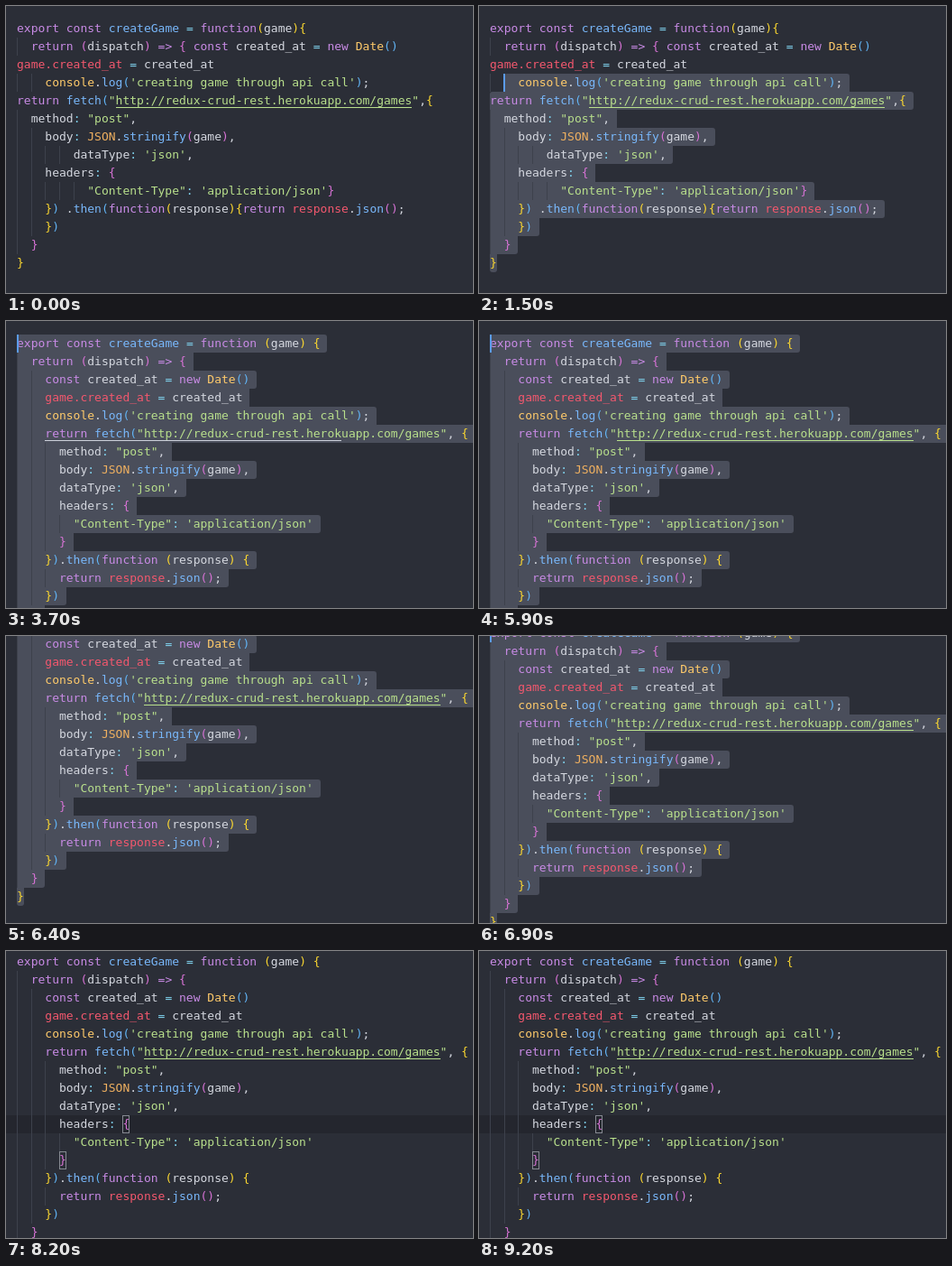
Animation of 518x318 px, one loop 9.3 s. Source, as an HTML page:

```html
<!DOCTYPE html>
<html lang="en">
<head>
<meta charset="utf-8">
<title>Code formatting</title>
<style>
  html, body { margin: 0; width: 100%; height: 100%; overflow: hidden; background: #2b2e37; }
  #stage {
    position: relative; width: 518px; height: 318px; overflow: hidden;
    background: #2b2e37; color: #d5d8e0;
    font: 13px/20px "DejaVu Sans Mono", "Liberation Mono", monospace;
    font-variant-ligatures: none;
  }
  .doc { position: absolute; left: 12px; top: 15px; width: 600px; }
  .doc div { position: absolute; box-sizing: border-box; height: 20px; white-space: pre; }
  .doc .sel { background: #4a4e5b; }
  .doc .guide { width: 1px; background: #3d414c; }
  .doc .link { height: 1px; background: #b9e08c; }
  .doc .link.stale { background: #ccd0da; }
  .doc .caret { width: 2px; margin-left: -.5px; background: #5b9bea; }
  .doc .active { left: -12px; width: 518px; background: rgba(0, 0, 0, .17); }
  .doc .match { width: 1ch; border: 1px solid #868a92; }
  .key { color: #c98be6; }
  .fn { color: #79b8fb; }
  .str { color: #b9e08c; }
  .type { color: #ffcb6b; }
  .json { color: #efb060; }
  .obj { color: #f4586e; }
  .op { color: #80d3ee; }
  .b0 { color: #fcd830; }
  .b1 { color: #d873d6; }
  .b2 { color: #62b5f6; }
</style>
</head>
<body>
<div id="stage"></div>
<script>
const LOOP = 9300, STEP = 100, ROW = 20;
const DRAG = 1000, FORMAT = 3500, RELINK = 4300, CLICK = 7500;
const URL_LENGTH = 42;

const roughCode = `export const createGame = function(game){
  return (dispatch) => { const created_at = new Date()
game.created_at = created_at
    console.log('creating game through api call');
return fetch("http://redux-crud-rest.herokuapp.com/games",{
  method: "post",
    body: JSON.stringify(game),
        dataType: 'json',
    headers: {
          "Content-Type": 'application/json'}
    }) .then(function(response){return response.json();
    })
  }
}`;

const tidyCode = `export const createGame = function (game) {
  return (dispatch) => {
    const created_at = new Date()
    game.created_at = created_at
    console.log('creating game through api call');
    return fetch("http://redux-crud-rest.herokuapp.com/games", {
      method: "post",
      body: JSON.stringify(game),
      dataType: 'json',
      headers: {
        "Content-Type": 'application/json'
      }
    }).then(function (response) {
      return response.json();
    })
  }
}`;

const TOKEN = new RegExp([
  /(?<str>"[^"]*"|'[^']*')/,
  /(?<key>\b(?:export|const|return|function|new)\b|=>)/,
  /(?<type>\b(?:console|Date)\b)/,
  /(?<json>\bJSON\b)/,
  /(?<fn>\bcreateGame\b|\w+(?=\())/,
  /(?<obj>\b(?:game|response)(?=\.)|(?<=game)\.created_at)/,
  /(?<op>[=:])/,
  /(?<br>[(){}])/,
  /(?<txt>\w+|\s+|.)/
].map(r => r.source).join("|"), "g");

const stage = document.getElementById("stage");

function add(parent, tag, cls, text = "") {
  const el = document.createElement(tag);
  el.className = cls;
  el.textContent = text;
  return parent.appendChild(el);
}

function place(el, row, col, width) {
  el.style.top = row * ROW + "px";
  el.style.left = col + "ch";
  if (width !== undefined) el.style.width = width + "ch";
  return el;
}

function show(el, on) {
  el.style.display = on ? "" : "none";
}

// Brackets take one of three colours by nesting depth.
function paint(el, text, depth) {
  for (const m of text.matchAll(TOKEN)) {
    let cls = Object.keys(m.groups).find(k => m.groups[k] !== undefined);
    if (cls === "br") {
      if (/[)}]/.test(m[0])) depth--;
      cls = "b" + depth % 3;
      if (/[({]/.test(m[0])) depth++;
    }
    add(el, "span", cls, m[0]);
  }
  return depth;
}

function makeDoc(code) {
  const el = add(stage, "div", "doc");
  const lines = code.split("\n");
  const active = add(el, "div", "active");
  const sels = lines.map(() => add(el, "div", "sel"));
  let depth = 0;
  lines.forEach((text, row) => {
    const indent = text.search(/\S/);
    for (let col = 0; col < indent; col += 2) place(add(el, "div", "guide"), row, col);
    depth = paint(place(add(el, "div", "line"), row, 0), text, depth);
  });
  add(place(add(el, "div", "line"), -2, 0), "span", "b0", "}");
  const link = add(el, "div", "link");
  const caret = add(el, "div", "caret");
  return { el, lines, active, sels, link, caret };
}

function setLink(doc, col, stale) {
  const row = doc.lines.findIndex(s => s.includes("http"));
  place(doc.link, row, col, URL_LENGTH).style.marginTop = "17px";
  doc.link.classList.toggle("stale", stale);
}

// Selects from the caret to the end of the code.
function select(doc, row, col) {
  const last = doc.lines.length - 1;
  const end = i => i < row || i > last ? -1 : doc.lines[i].length + (i < last ? 1 : 0);
  doc.sels.forEach((el, i) => {
    const from = i === row ? col : 0;
    show(el, end(i) > from);
    place(el, i, from, Math.max(0, end(i) - from));
    const corner = near => end(near) < end(i) ? "3px" : "0";
    const topLeft = i === row || (i === row + 1 && col > 0) ? "3px" : "0";
    el.style.borderRadius =
      `${topLeft} ${corner(i - 1)} ${corner(i + 1)} ${i === last ? "3px" : "0"}`;
  });
}

const rough = makeDoc(roughCode);
const tidy = makeDoc(tidyCode);
const urlCol = doc => doc.lines.find(s => s.includes("http")).indexOf("http");
setLink(rough, urlCol(rough), false);
show(rough.active, false);

const headRow = tidy.lines.findIndex(s => s.includes("headers"));
const headCol = tidy.lines[headRow].length;
place(tidy.active, headRow, 0).style.left = "-12px";
const matches = [
  place(add(tidy.el, "div", "match"), headRow, headCol - 1),
  place(add(tidy.el, "div", "match"), headRow + 2, 6)
];

// Caret row and column while the selection is dragged upwards.
const dragPath = [[13, 1], [12, 3], [10, 3], [8, 2], [5, 2], [3, 2], [1, 1], [0, 0]];

const scrollKeys = [[5900, 0], [6400, 56], [6600, 56], [7300, -15], [7400, -15], [7700, 13]];

function scrollAt(t) {
  const i = scrollKeys.findIndex(k => t < k[0]);
  if (i < 0) return scrollKeys.at(-1)[1];
  if (i === 0) return 0;
  const [t0, a] = scrollKeys[i - 1], [t1, b] = scrollKeys[i];
  const u = (t - t0) / (t1 - t0);
  return Math.round(a + (b - a) * u * u * (3 - 2 * u));
}

const blink = t => t % 1000 < 500;

function drawRough(t) {
  const dragEnd = DRAG + (dragPath.length - 1) * STEP;
  const step = Math.min(dragPath.length - 1, Math.floor((t - DRAG) / STEP));
  const [row, col] = dragPath[Math.max(0, step)];
  select(rough, row, col);
  place(rough.caret, row, col);
  show(rough.caret, t >= DRAG && (t < dragEnd || blink(t - dragEnd)));
}

function drawTidy(t) {
  const clicked = t >= CLICK;
  if (clicked) select(tidy, tidy.lines.length, 0);
  else select(tidy, 0, 0);
  const stale = t < RELINK;
  setLink(tidy, stale ? 4 : urlCol(tidy), stale);
  place(tidy.caret, clicked ? headRow : 0, clicked ? headCol : 0);
  show(tidy.caret, blink(t - FORMAT));
  [tidy.active, ...matches].forEach(el => show(el, clicked));
  tidy.el.style.transform = `translateY(${-scrollAt(t)}px)`;
}

let shown = -1;
function frame() {
  const t = Math.floor(performance.now() % LOOP / STEP) * STEP;
  if (t !== shown) {
    shown = t;
    const formatted = t >= FORMAT;
    show(rough.el, !formatted);
    show(tidy.el, formatted);
    if (formatted) drawTidy(t);
    else drawRough(t);
  }
  requestAnimationFrame(frame);
}
frame();
</script>
</body>
</html>
```
